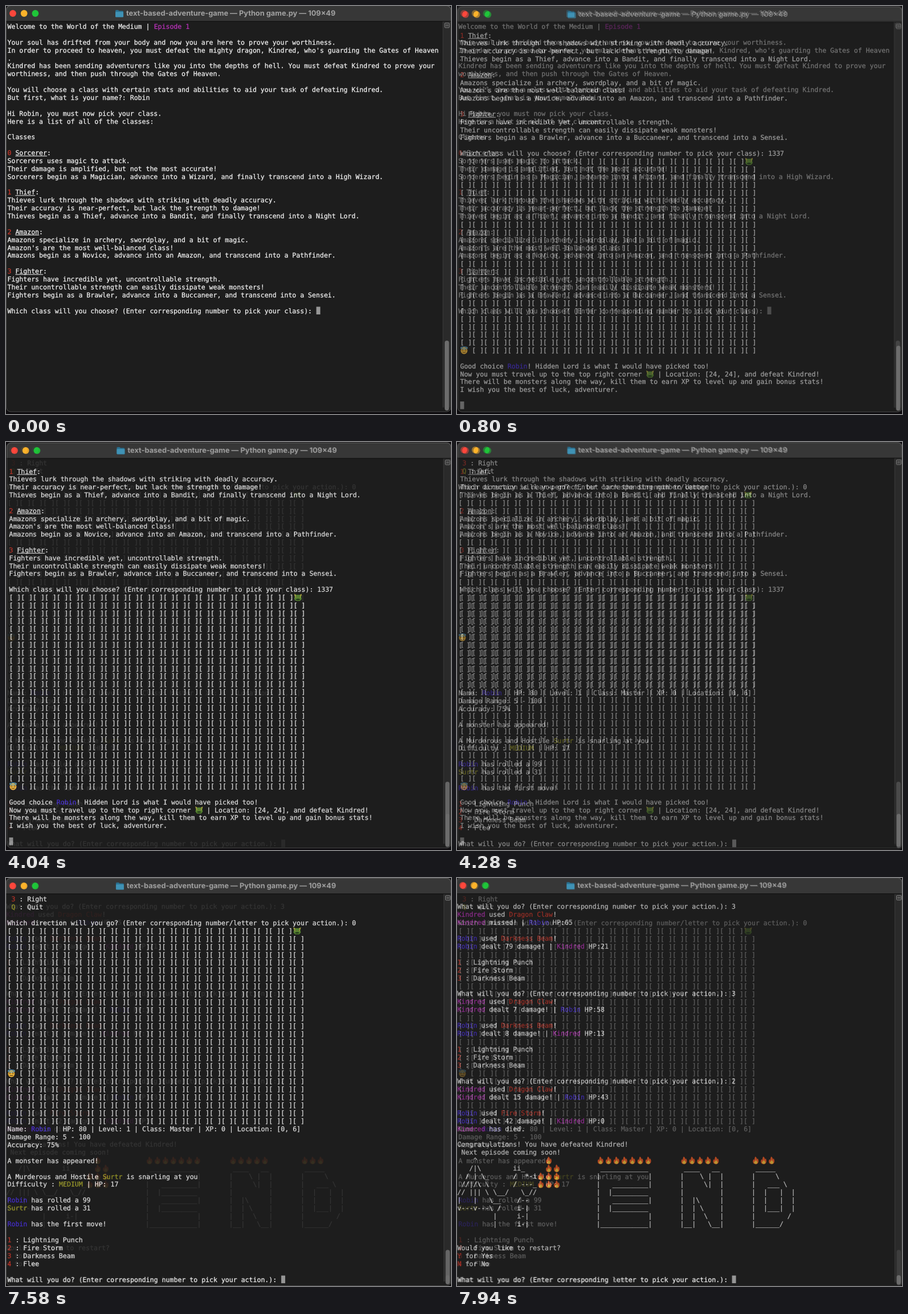
An HTML page that plays this animation: 781x717 px, repeating every 8000 ms.

```html
<!DOCTYPE html>
<html lang="en">
<head>
<meta charset="utf-8">
<title>Terminal adventure</title>
<style>
html, body { margin: 0; width: 100%; height: 100%; overflow: hidden; background: #0d0b0e; }
svg { display: block; width: 781px; height: 717px; }
text { white-space: pre; text-rendering: geometricPrecision; }
.mono { font-family: "DejaVu Sans Mono", "Liberation Mono", monospace; }
.title { font: 700 12.8px Inter, Roboto, sans-serif; fill: #a2a2a2; }
</style>
</head>
<body>
<svg id="stage" viewBox="0 0 781 717" xmlns="http://www.w3.org/2000/svg"></svg>
<script>
const stage = document.getElementById('stage');
const HERO = 'Robin';
const COLORS = { r: '#c9362a', b: '#4a30df', m: '#bb32bb', y: '#a6a52a', w: '#f4f4f4', u: '#f4f4f4' };

function add(parent, tag, attrs, text) {
  const el = document.createElementNS('http://www.w3.org/2000/svg', tag);
  for (const k in attrs) el.setAttribute(k, attrs[k]);
  if (text) el.textContent = text;
  parent.appendChild(el);
  return el;
}
const rect = (p, x, y, width, height, fill, more) => add(p, 'rect', { x, y, width, height, fill, ...more });
const path = (p, d, fill, more) => add(p, 'path', { d, fill, ...more });
const dot = (p, cx, cy, r, fill) => add(p, 'circle', { cx, cy, r, fill });

// Sprites are drawn in a 14 x 14 box centred on the origin.
const sprites = {
  halo(g) {
    dot(g, 0, .6, 6, '#f3b234');
    dot(g, 0, 1.2, 4.8, '#fbc540');
    add(g, 'ellipse', { cx: 0, cy: -4.2, rx: 5.6, ry: 1.7, fill: 'none', stroke: '#6fc2ea', 'stroke-width': 1.4 });
    path(g, 'M-4 0q1.4-1.6 2.8 0M1.2 0q1.4-1.6 2.8 0M-3 2.6q3 2.6 6 0', 'none', { stroke: '#6b3b12', 'stroke-width': 1.1 });
  },
  dragon(g) {
    path(g, 'M-6.6-6L-3-4.4H3L6.6-6L5.6-1L6.4 3L3.6 6.4H-3.6L-6.4 3L-5.6-1Z', '#5d8f33');
    path(g, 'M-6.6-6L-3.4-4.2L-5.2-1.5ZM6.6-6L3.4-4.2L5.2-1.5Z', '#c5a845');
    path(g, 'M-4.4-2L-1-.3L-4 .8ZM4.4-2L1-.3L4 .8Z', '#e8d95a');
    path(g, 'M-3.8 3.4Q0 1.4 3.8 3.4L2.6 5H-2.6Z', '#26401b');
    dot(g, -2.6, -.4, .8, '#222');
    dot(g, 2.6, -.4, .8, '#222');
  },
  fire(g) {
    path(g, 'M-.8-6.8C1.8-5 1.8-3.2 2.4-1.8C3-2.4 3.2-3 3.2-3.8C6 0 5.4 6.4 0 6.4C-5.8 6.4-6 .8-3.6-2.4C-3.2-1.4-2.8-1-2.2-.8C-2.4-3-2-5-.8-6.8Z', '#ee5a24');
    path(g, 'M.2-1.2C.8 1 3 1.6 2.9 3.6C2.8 5.4 1.4 6.2 0 6.2C-2 6.2-3.2 5-3 3C-2.7 1.8-1.4 2-.9 1C-.5 .3-.1-.4 .2-1.2Z', '#fcc53c');
  }
};

function frame(g, o) {
  const { left, top, bar, bottom, mid, shift, thumb } = o;
  rect(g, 0, 0, 781, 717, '#0d0b0e');
  const w = 781.5 - left;
  rect(g, left, top, w, bottom - top, '#1d1d1d', { rx: 8 });
  path(g, `M${left} ${bar}V${top + 8}q0-8 8-8H773.5q8 0 8 8V${bar}Z`, '#373737');
  rect(g, left, bar, w, 1, '#0f0f0f');
  ['#fe473c', '#fdb32b', '#1fc539'].forEach((c, i) => dot(g, 12 + o.lights + i * 19.7, mid, 5.9, c));

  const fx = 192 + shift, fy = mid - 6;
  path(g, `M${fx} ${fy + 1.5}q0-1.5 1.5-1.5h3.5l1.5 1.5h6q1.5 0 1.5 1.5v8q0 1.5-1.5 1.5h-11q-1.5 0-1.5-1.5Z`, '#286f8f');
  rect(g, fx, fy + 3.2, 14, 9.3, '#3f92b5', { rx: 1.3 });
  add(g, 'text', { x: 211 + shift, y: mid + 4.4, class: 'title' }, 'text-based-adventure-game — Python game.py — 109×49');

  const sx = o.scroll;
  rect(g, sx, bar + 1, 781 - sx, bottom - bar - 9, '#2a2a2a');
  rect(g, sx, bar + 1, 1, bottom - bar - 9, '#3b3b3b');
  rect(g, sx + 3.5, bar + 3.5, 8, 8, 'none', { stroke: '#8b8b8b', rx: 1 });
  path(g, `M${sx + 5} ${bar + 6.5}h5M${sx + 5} ${bar + 8.5}h5`, 'none', { stroke: '#8b8b8b', 'stroke-width': .9 });
  rect(g, sx + 3.5, thumb[0], 7.5, thumb[1] - thumb[0], '#6c6c6c', { rx: 3.75 });
  rect(g, left + .5, top + .5, w - 1, bottom - top - 1, 'none', { rx: 8, stroke: '#fff', 'stroke-opacity': .2 });
}

// Lines are {row: text}; {c|text} sets a colour or an underline.
function terminal(o) {
  const g = add(stage, 'g', {});
  frame(g, o);
  const { x0, y0, cw, rh } = o;
  const size = cw / .602;
  for (const row in o.lines) {
    const y = y0 + row * rh;
    let col = 0;
    for (const [, style = 'w', marked, plain] of o.lines[row].matchAll(/\{(\w)\|([^}]*)\}|([^{]+)/g)) {
      const str = marked ?? plain;
      const x = x0 + col * cw, fill = COLORS[style];
      if (str.trim()) {
        add(g, 'text', { x, y: y + 4, class: 'mono', 'font-size': size, fill, stroke: fill, 'stroke-width': .25 }, str);
      }
      if (style === 'u') rect(g, x, y + 5.2, str.length * cw, 1, fill);
      col += str.length;
    }
  }
  for (const [name, col, row] of o.sprites || []) {
    const s = add(g, 'g', { transform: `translate(${x0 + (col + 1) * cw} ${y0 + row * rh})` });
    sprites[name](s);
  }
  const [cc, cr] = o.cursor;
  rect(g, x0 + cc * cw, y0 + cr * rh - 7, cw, 13.5, '#969696');
  return g;
}

const block = (start, list) => Object.fromEntries(list.map((s, i) => [start + i, s]));
const hero = `{b|${HERO}}`, dragon = '{m|Kindred}';

const classes = [
  '{r|1} {u|Thief}:',
  'Thieves lurk through the shadows with striking with deadly accuracy.',
  'Their accuracy is near-perfect, but lack the strength to damage!',
  'Thieves begin as a Thief, advance into a Bandit, and finally transcend into a Night Lord.',
  '',
  '{r|2} {u|Amazon}:',
  'Amazons specialize in archery, swordplay, and a bit of magic.',
  "Amazon's are the most well-balanced class!",
  'Amazons begin as a Novice, advance into an Amazon, and transcend into a Pathfinder.',
  '',
  '{r|3} {u|Fighter}:',
  'Fighters have incredible yet, uncontrollable strength.',
  'Their uncontrollable strength can easily dissipate weak monsters!',
  'Fighters begin as a Brawler, advance into a Buccaneer, and transcend into a Sensei.',
  '',
  'Which class will you choose? (Enter corresponding number to pick your class): '
];

const intro = [
  'Welcome to the World of the Medium | {m|Episode 1}',
  '',
  'Your soul has drifted from your body and now you are here to prove your worthiness.',
  "In order to proceed to heaven, you must defeat the mighty dragon, Kindred, who's guarding the Gates of Heaven",
  '.',
  'Kindred has been sending adventurers like you into the depths of hell. You must defeat Kindred to prove your',
  'worthiness, and then push through the Gates of Heaven.',
  '',
  'You will choose a class with certain stats and abilities to aid your task of defeating Kindred.',
  `But first, what is your name?: ${HERO}`,
  '',
  `Hi ${HERO}, you must now pick your class.`,
  'Here is a list of all of the classes:',
  '',
  'Classes',
  '',
  '{r|0} {u|Sorcerer}:',
  'Sorcerers uses magic to attack.',
  'Their damage is amplified, but not the most accurate!',
  'Sorcerers begin as a Magician, advance into a Wizard, and finally transcend into a High Wizard.',
  ''
];

// 25 x 25 map: dragon in the top right cell, player in the first column.
const map = player => Array.from({ length: 25 }, (_, i) =>
  i === 0 ? '[ ]'.repeat(24) : i === player ? '   ' + '[ ]'.repeat(24) : '[ ]'.repeat(25));

const ask = (what, answer = '') => `What will you do? (Enter corresponding ${what} to pick your action.): ${answer}`;
const moves = ['{r|1} : Lightning Punch', '{r|2} : Fire Storm', '{r|3} : Darkness Beam'];

const arrival = [
  `Good choice ${hero}! Hidden Lord is what I would have picked too!`,
  'Now you must travel up to the top right corner    | Location: [24, 24], and defeat Kindred!',
  'There will be monsters along the way, kill them to earn XP to level up and gain bonus stats!',
  'I wish you the best of luck, adventurer.'
];

const encounter = [
  `Name: ${hero} | HP: 80 | Level: 1 | Class: Master | XP: 0 | Location: [0, 6]`,
  'Damage Range: 5 - 100',
  'Accuracy: 75%',
  '',
  'A monster has appeared!',
  '',
  'A Murderous and Hostile {y|Surtr} is snarling at you',
  'Difficulty : {y|MEDIUM} | HP: 17',
  '',
  `${hero} has rolled a 99`,
  '{y|Surtr} has rolled a 31',
  '',
  `${hero} has the first move!`,
  '',
  ...moves,
  '{r|4} : Flee',
  '',
  ask('number')
];

const claw = `${dragon} used {r|Dragon Claw}!`;
const cast = spell => `${hero} used {r|${spell}}!`;
const hit = (who, n, whom, hp) => `${who} dealt ${n} damage! | ${whom} HP:${hp}`;
const battle = [
  ask('number', 3), claw, `${dragon} missed! | ${hero} HP:65`, '',
  cast('Darkness Beam'), hit(hero, 79, dragon, 21), '', ...moves, '',
  ask('number', 3), claw, hit(dragon, 7, hero, 58), '',
  cast('Darkness Beam'), hit(hero, 8, dragon, 13), '', ...moves, '',
  ask('number', 2), claw, hit(dragon, 15, hero, 43), '',
  cast('Fire Storm'), hit(hero, 42, dragon, 0), `${dragon} has died.`, '',
  'Congratulations! You have defeated Kindred!',
  ' Next episode coming soon!'
];

const rows = s => s.split('\n').slice(1, -1);
const beast = rows(String.raw`
    ^
   /|\        ii_
  / | \_      /  *-i
 //|/\ \      / ---_
// ||| \ \__/   \_//
|   |   \__    /--
v---v---\ /    i-|
         |     i-|
         |     i-|
`);
const letterE = rows(String.raw`

 ____________
|            |
|   _________|
|  |_________
|   _________|
|  |_________
|            |
|____________|
`);
const letterN = rows(String.raw`

 ____   __
|    \ |  |
|     \|  |
|         |
|  |\     |
|  | \    |
|  |  \   |
|__|   \__|
`);
const letterD = rows(String.raw`

 _____
|     \
|   ___ \
|  |   |  |
|  |   |  |
|  |___|  |
|        /
|______/
`);
const art = beast.map((s, i) => s.padEnd(35) + letterE[i].padEnd(21) + letterN[i].padEnd(18) + letterD[i]);
const flames = [[22, 33, 1], [35, 33, 7], [56, 33, 5], [74, 33, 3], [22, 34, 2], [20, 35, 3], [20, 36, 3]]
  .flatMap(([col, row, n]) => Array.from({ length: n }, (_, i) => ['fire', col + 2 * i, row]));

const screens = [
  {
    left: 0, top: -1, bar: 26.5, bottom: 713.5, mid: 13, lights: 0, shift: 0, scroll: 766.5, thumb: [588, 711],
    x0: 2.5, y0: 36, cw: 6.95, rh: 13.875,
    lines: block(0, [...intro, ...classes]), cursor: [78, 36]
  },
  {
    left: 1, top: 1, bar: 28.5, bottom: 714, mid: 15, lights: 3, shift: 2.5, scroll: 767.5, thumb: [597, 711.5],
    x0: 5.5, y0: 51.5, cw: 6.945, rh: 13.84,
    lines: {
      ...block(0, [...classes.slice(0, -1), classes.at(-1) + '1337']),
      ...block(16, map(24)), ...block(42, arrival)
    },
    sprites: [['dragon', 72, 16], ['halo', 0, 40], ['dragon', 47, 43]], cursor: [0, 47]
  },
  {
    left: 0, top: 0, bar: 27.5, bottom: 717, mid: 14, lights: 0, shift: 1, scroll: 768, thumb: [653.5, 714],
    x0: 2.5, y0: 37, cw: 6.965, rh: 13.93,
    lines: {
      ...block(0, [' {r|3} : Right', ' {y|Q} : Quit', '',
        'Which direction will you go? (Enter corresponding number/letter to pick your action.): 0']),
      ...block(4, map(18)), ...block(29, encounter)
    },
    sprites: [['dragon', 72, 4], ['halo', 0, 22]], cursor: [69, 48]
  },
  {
    left: -1, top: -1, bar: 27, bottom: 719, mid: 13, lights: -2, shift: 0, scroll: 768, thumb: [698, 715.5],
    x0: .5, y0: 36, cw: 6.985, rh: 13.95,
    lines: {
      ...block(1, battle), ...block(33, art),
      ...block(44, ['Would you like to restart?', '{r|Y} for Yes', '{r|N} for No', '', ask('letter')])
    },
    sprites: flames, cursor: [69, 48]
  }
].map(terminal);

const LOOP = 8000, STEP = 60;
const fadeStarts = [500, 4040, 7580];
const fade = (t, start) => t < start ? 0 : Math.min(1, (Math.floor((t - start) / STEP) + 1) / 10);

function draw(t) {
  fadeStarts.forEach((start, i) => screens[i + 1].setAttribute('opacity', fade(t, start)));
}
const origin = performance.now();
function tick() {
  draw((performance.now() - origin) % LOOP);
  requestAnimationFrame(tick);
}
tick();
</script>
</body>
</html>
```
